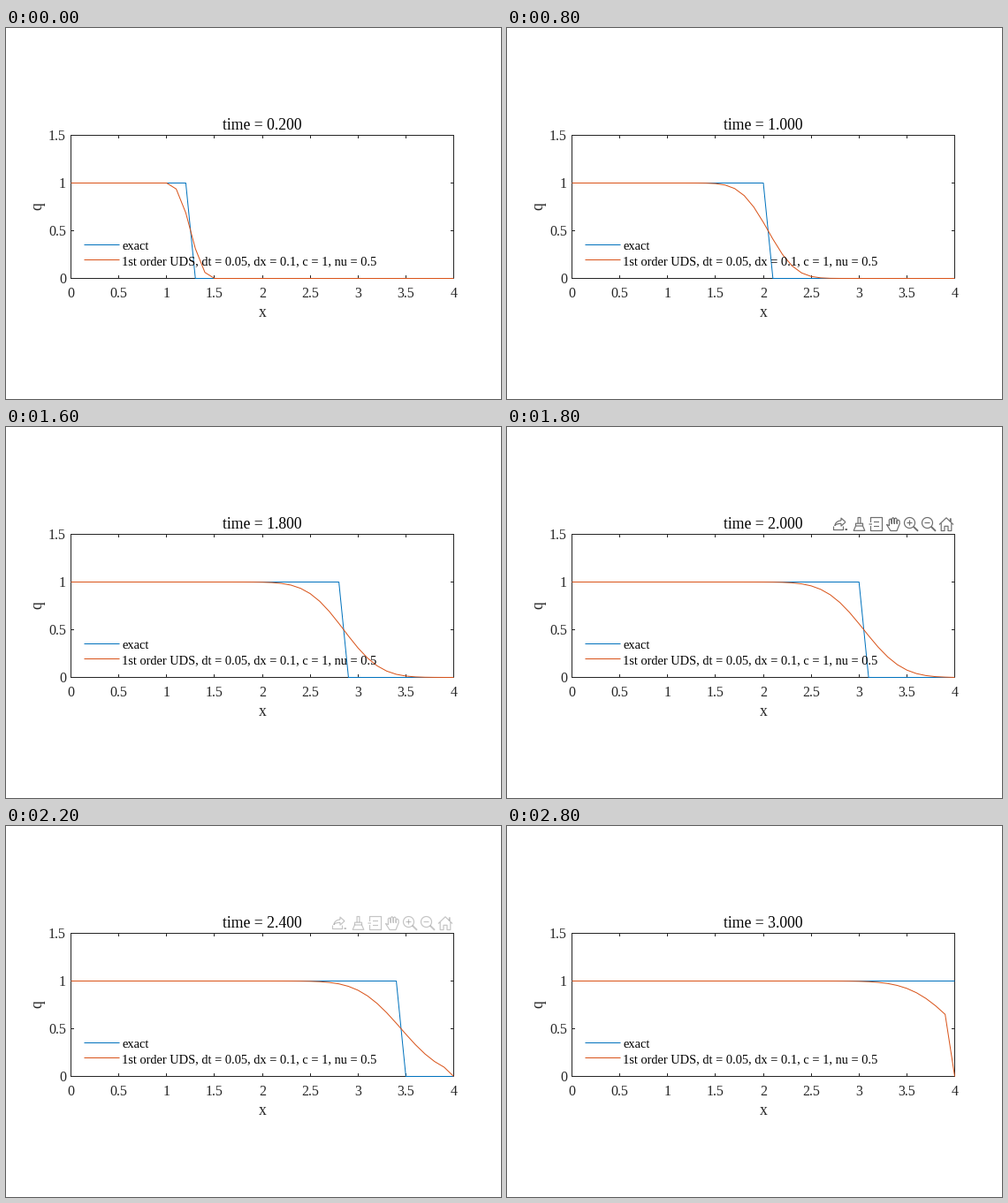
Animation of 560 by 420 pixels, one loop 3 s. Source, as a matplotlib script:

```python
import numpy as np
import matplotlib.pyplot as plt
from matplotlib.animation import FuncAnimation

W, H, DPI = 560, 420, 100
PT = 72 / DPI                       # one pixel in points
BLUE, ORANGE = "#0072BD", "#D95319"
INK, ICON = "#262626", "#6e6e6e"
LEFT, RIGHT, TOP, BOTTOM = 73.5, 506.5, 121.5, 283.5
FRAMES, INTERVAL = 15, 200

plt.rcParams["font.family"] = "Liberation Serif"
fig = plt.figure(figsize=(W / DPI, H / DPI), dpi=DPI, facecolor="white")
ax = fig.add_axes([0, 0, 1, 1])
ax.set_xlim(0, W)
ax.set_ylim(H, 0)
ax.axis("off")


def px(x):
    return LEFT + (RIGHT - LEFT) * np.asarray(x) / 4


def py(q):
    return BOTTOM - (BOTTOM - TOP) * np.asarray(q) / 1.5


def line(xs, ys, color=INK, width=1.0, **kw):
    kw.setdefault("solid_capstyle", "butt")
    return ax.plot(xs, ys, color=color, lw=width * PT, snap=False, **kw)[0]


def label(x, y, s, size=16, color=INK, **kw):
    return ax.text(x, y, s, fontsize=size * PT, color=color,
                   va="baseline", **kw)


# Axes box, inward ticks and tick labels
line([LEFT, RIGHT, RIGHT, LEFT, LEFT], [BOTTOM, BOTTOM, TOP, TOP, BOTTOM],
     solid_joinstyle="miter", solid_capstyle="projecting")
TICK = 3.5
for v in np.arange(0, 4.1, 0.5):
    x = np.floor(px(v)) + 0.5
    line([x, x], [BOTTOM, BOTTOM - TICK])
    line([x, x], [TOP, TOP + TICK])
    label(px(v), 305, f"{v:g}", ha="center")
for v in np.arange(0, 1.6, 0.5):
    y = py(v)
    line([LEFT, LEFT + TICK], [y, y])
    line([RIGHT, RIGHT - TICK], [y, y])
    label(68, y + 5.7, f"{v:g}", ha="right")

label(290, 327, "x", 17.6, ha="center")
label(40.5, 201.5, "q", 17.6, rotation=90, rotation_mode="anchor",
      ha="center")
title = label(245, 115, "", 17.6, "black")

# Curves, then the legend above them
exact = line([], [], BLUE, zorder=3, solid_joinstyle="round")
upwind = line([], [], ORANGE, zorder=4, solid_joinstyle="round")
legend = (("exact", BLUE),
          ("1st order UDS, dt = 0.05, dx = 0.1, c = 1, nu = 0.5", ORANGE))
for row, (text, color) in enumerate(legend):
    y = 245.5 + 17 * row
    line([88.5, 128.5], [y, y], color, zorder=5)
    label(131, y + 5.5, text, 14.33, "black", zorder=5)

# Toolbar icons
icons = []


def stroke(*pts, width=1.2):
    xs, ys = zip(*pts)
    icons.append(line(xs, ys, ICON, width, solid_joinstyle="round"))


def mirror(cx, *half, width=1.2):
    """Outline symmetric about cx, given its left half as offsets."""
    stroke(*[(cx + dx, y) for dx, y in half],
           *[(cx - dx, y) for dx, y in reversed(half)], width=width)


def arc(cx, cy, rx, ry, start, end):
    a = np.radians(np.linspace(start, end, 40))
    stroke(*zip(cx + rx * np.cos(a), cy + ry * np.sin(a)))


def export(cx):
    arc(cx + 1, 112, 7, 6, 180, 270)
    arc(cx + 1, 112, 7, 2.7, 180, 270)
    for s in (-1, 1):
        stroke((cx + 1, 107.6 + 1.6 * s), (cx + 1, 107.6 + 4.5 * s),
               (cx + 6, 107.6))
    mirror(cx - 2, (-5.5, 112.5), (-5.5, 116.5))
    stroke((cx + 5.5, 116), (cx + 8, 116), width=2)


def brush(cx):
    mirror(cx, (-1.4, 109), (-1.4, 102.5))
    mirror(cx, (-4, 112), (-4, 109.2))
    mirror(cx, (-4, 112), (-6.3, 117.3))
    mirror(cx, (-4, 112))


def data_tip(cx):
    for y, side in ((102.5, 108), (117.5, 112)):
        stroke((cx - 6.5, side), (cx - 6.5, y), (cx + 6.5, y), (cx + 6.5, 110))
    stroke((cx - 8.5, 110), (cx - 5, 110))
    for y in (107.5, 112.5):
        mirror(cx, (-3, y))


def hand(cx):
    pts = [(cx - 4.5, 111.5)]
    for i in range(4):
        x, tip = cx - 4.7 + 3 * i, 102.5 + 0.9 * (i - 1.3) ** 2
        pts += [(x, tip + 1.2), (x + 1.4, tip), (x + 2.7, tip + 1.2),
                (x + 2.9, 109.5)]
    stroke(*pts, (cx + 4, 117.5), (cx - 3, 117.5), (cx - 7.5, 110.5), pts[0])


def lens(cx, plus):
    arc(cx, 108.5, 6, 6, 0, 360)
    mirror(cx, (-3, 108.5))
    if plus:
        stroke((cx, 105.5), (cx, 111.5))
    stroke((cx + 4.3, 112.8), (cx + 9.5, 117.8), width=1.9)


def home(cx):
    mirror(cx, (-8, 110.5), (0, 102.8))
    stroke((cx + 4.8, 103.3), (cx + 4.8, 107.3), width=1.8)
    for s in (-1, 1):
        stroke(*[(cx + s * d, y) for d, y in
                 ((5.8, 109), (5.8, 117.5), (2, 117.5), (2, 112.3), (0, 112.3))])


export(377)
brush(398.5)
data_tip(418)
hand(437)
lens(455.5, True)
lens(475.5, False)
home(497)

GRID = np.linspace(0, 4, 41)


def step(front):
    return (GRID <= front + 1e-9).astype(float)


def advect(steps, nu=0.5):
    q = step(1)
    for _ in range(steps):
        q[1:-1] -= nu * (q[1:-1] - q[:-2])
    return q


def toolbar_alpha(k):
    return np.clip(1 - 0.6 * (k - 10), 0, 1) if k >= 9 else 0


def update(k):
    t = 0.2 * (k + 1)
    title.set_text(f"time = {t:.3f}")
    exact.set_data(px(GRID), py(step(1 + t)))
    upwind.set_data(px(GRID), py(advect(4 * (k + 1))))
    alpha = toolbar_alpha(k)
    for art in icons:
        art.set_visible(alpha > 0)
        art.set_alpha(alpha)
    return [title, exact, upwind, *icons]


anim = FuncAnimation(fig, update, frames=FRAMES, interval=INTERVAL,
                     repeat=True, repeat_delay=0, blit=False)
plt.show()
```
